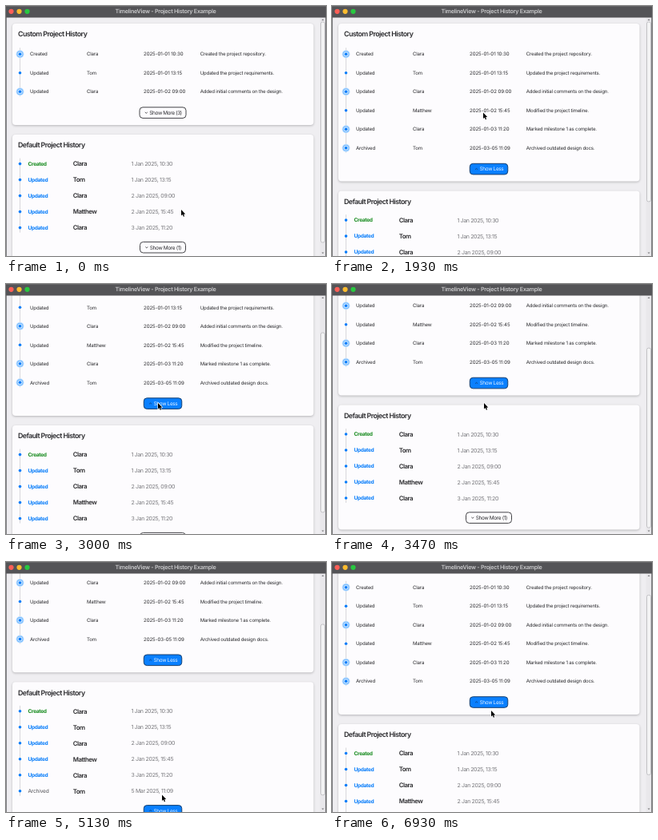
These frames come from a looping animation (400x313 px, 7000 ms). An HTML page with a canvas:

```html
<!DOCTYPE html>
<html lang="en">
<head>
<meta charset="utf-8">
<title>TimelineView</title>
<style>
html, body { margin: 0; width: 100%; height: 100%; overflow: hidden; background: #444; }
canvas { display: block; width: 400px; height: 313px; }
</style>
</head>
<body>
<canvas id="stage"></canvas>
<script>
const W = 400, H = 313, LOOP = 7000;
const canvas = document.getElementById('stage');
const ctx = canvas.getContext('2d');
const dpr = window.devicePixelRatio || 1;
canvas.width = W * dpr;
canvas.height = H * dpr;
ctx.textRendering = 'geometricPrecision';

const BLUE = '#087dfa', INK = '#29292c', GREY = '#77777b';
const FAMILY = 'Inter, "Liberation Sans", sans-serif';
const STYLES = {
  bar:    { size: 7.2, weight: 600, gap: -0.28 },
  title:  { size: 8.8, weight: 600, gap: -0.55 },
  cell:   { size: 6.1, weight: 400, gap: -0.19 },
  stamp:  { size: 6.1, weight: 400, gap: -0.06 },
  button: { size: 6.5, weight: 400, gap: -0.38 },
  state:  { size: 6.6, weight: 700, gap: -0.36 },
  plain:  { size: 6.6, weight: 400, gap: -0.2 },
  name:   { size: 7.8, weight: 600, gap: -0.48 },
  date:   { size: 7, weight: 400, gap: -0.36 }
};

// action, person, time, note, has halo
const EVENTS = [
  ['Created', 'Clara', '2025-01-01 10:30', 'Created the project repository.', true],
  ['Updated', 'Tom', '2025-01-01 13:15', 'Updated the project requirements.', false],
  ['Updated', 'Clara', '2025-01-02 09:00', 'Added initial comments on the design.', true],
  ['Updated', 'Matthew', '2025-01-02 15:45', 'Modified the project timeline.', false],
  ['Updated', 'Clara', '2025-01-03 11:20', 'Marked milestone 1 as complete.', true],
  ['Archived', 'Tom', '2025-03-05 11:09', 'Archived outdated design docs.', true]
];
const MONTHS = { '01': 'Jan', '03': 'Mar' };

// time, x, y; eased between entries
const POINTER = [
  [70, 219, 255], [1130, 189, 133.5], [1930, 189, 133.5], [2270, 190, 149],
  [3730, 190, 149], [4270, 195, 291.5], [5200, 195, 291.5], [5600, 196, 288.5],
  [6640, 196, 288.5], [6930, 199, 186]
];
const OPEN_FIRST = 1430, OPEN_SECOND = 4600, CLOSE_SECOND = 5950;

const clamp = v => Math.max(0, Math.min(1, v));
const smooth = v => v * v * (3 - 2 * v);

function pointerAt(t) {
  let a = POINTER[0];
  for (const b of POINTER) {
    if (t < b[0]) {
      const k = smooth(clamp((t - a[0]) / (b[0] - a[0])));
      return { x: a[1] + (b[1] - a[1]) * k, y: a[2] + (b[2] - a[2]) * k };
    }
    a = b;
  }
  return { x: a[1], y: a[2] };
}

function scrollAt(t) {
  const span = (from, to) => clamp((t - from) / (to - from));
  if (t < 3000) return t < 2470 ? 4.3 * span(2400, 2470) : 4.3 + 50.1 * span(2470, 3000);
  if (t < 5200) return 54.4 + 26.9 * (1 - (1 - span(3000, 3600)) ** 2);
  // collapsing the second list shortens the page, so the view snaps back
  if (t < CLOSE_SECOND) return 81.3 + 20 * smooth(span(5200, 5700));
  return 81.3 - 52.7 * smooth(span(6130, 6600));
}

function text(str, x, y, style, color, align = 'left') {
  const s = STYLES[style];
  ctx.font = `${s.weight} ${s.size}px ${FAMILY}`;
  ctx.letterSpacing = s.gap + 'px';
  ctx.textAlign = align;
  ctx.fillStyle = color;
  ctx.fillText(str, x, y + s.size * 0.36);
}

function disc(x, y, r, color) {
  ctx.fillStyle = color;
  ctx.beginPath();
  ctx.arc(x, y, r, 0, Math.PI * 2);
  ctx.fill();
}

function box(x, y, w, h, r, fill, stroke) {
  ctx.beginPath();
  ctx.roundRect(x, y, w, h, r);
  ctx.fillStyle = fill;
  ctx.fill();
  if (stroke) {
    ctx.strokeStyle = stroke;
    ctx.lineWidth = 1;
    ctx.stroke();
  }
}

function path(points, close) {
  ctx.beginPath();
  points.forEach(([x, y]) => ctx.lineTo(x, y));
  if (close) ctx.closePath();
}

function card(y, h, title) {
  ctx.save();
  ctx.shadowColor = 'rgba(0,0,0,0.24)';
  ctx.shadowBlur = 3 * dpr;
  ctx.shadowOffsetY = dpr;
  box(8, y, 376.5, h, 4, '#fdfcfe');
  ctx.restore();
  text(title, 15, y + 13.3, 'title', INK);
}

function rail(from, to) {
  ctx.fillStyle = '#cfcfd3';
  ctx.fillRect(17.1, from, 0.8, to - from);
}

function button(y, hidden, open, mouse) {
  const w = open ? 47.5 : hidden > 1 ? 58 : 57;
  const x = 196 - w / 2;
  const over = mouse.x > x && mouse.x < x + w && Math.abs(mouse.y - y) < 7;
  const active = open || over;
  box(x, y - 6.8, w, 13.6, 4, active ? '#0a80ff' : '#fdfcfe', active ? '#173f6e' : '#444448');
  const tip = open ? -0.7 : 0.7;
  path([[x + 6.8, y - tip], [x + 8.3, y + tip], [x + 9.8, y - tip]]);
  ctx.strokeStyle = active ? '#123a6b' : INK;
  ctx.lineWidth = 0.8;
  ctx.stroke();
  const label = open ? 'Show Less' : `Show More (${hidden})`;
  text(label, x + 12.3, y, 'button', active ? '#e4f1ff' : INK);
}

function haloDot(x, y) {
  disc(x, y, 5, '#c3e1ff');
  disc(x, y, 4, '#74baff');
  disc(x, y, 3, '#c3e1ff');
  disc(x, y, 1.8, BLUE);
}

function customRows(y, count) {
  rail(y - 8, y + 23.5 * (count - 1) + 6);
  EVENTS.slice(0, count).forEach(([action, who, when, note, halo], i) => {
    const ry = y + i * 23.5;
    if (halo) haloDot(17.5, ry);
    else disc(17.5, ry, 1.8, BLUE);
    text(action, 30, ry, 'cell', INK);
    text(who, 101, ry, 'cell', INK);
    text(when, 172, ry, 'stamp', INK);
    text(note, 242.7, ry, 'cell', INK);
  });
}

function longDate(stamp) {
  const [day, time] = stamp.split(' ');
  const [year, month, date] = day.split('-');
  return `${+date} ${MONTHS[month]} ${year}, ${time}`;
}

function defaultRows(y, count) {
  const colors = { Created: '#148a1c', Updated: BLUE, Archived: '#555559' };
  rail(y - 7, y + 20 * (count - 1) + 6);
  EVENTS.slice(0, count).forEach(([action, who, when], i) => {
    const ry = y + i * 20;
    disc(17.5, ry, 1.8, BLUE);
    text(action, 27.5, ry, action === 'Archived' ? 'plain' : 'state', colors[action]);
    text(who, 83.7, ry, 'name', INK);
    text(longDate(when), 156.5, ry, 'date', GREY);
  });
}

function scrollBar(scroll, content) {
  ctx.fillStyle = '#e9e8eb';
  ctx.fillRect(392.5, 14, 7.5, 299);
  const len = 286 * 299 / content;
  box(393.5, 20 + scroll / content * 286, 5, len, 2, '#f3f3f4', '#c2c2c5');
  ctx.fillStyle = '#77777a';
  path([[394.5, 18], [396, 16.3], [397.5, 18]], true);
  ctx.fill();
  path([[394.5, 308.5], [396, 310.2], [397.5, 308.5]], true);
  ctx.fill();
}

function windowFrame() {
  ctx.fillStyle = '#66666a';
  ctx.fillRect(0, 14, 0.8, 299);
  ctx.fillRect(399.2, 14, 0.8, 299);
  ctx.fillStyle = '#545457';
  ctx.fillRect(0, 0, W, 14.5);
  ctx.fillStyle = '#69696c';
  ctx.fillRect(0, 0, W, 0.8);
  ['#ff5f57', '#febc2e', '#28c840'].forEach((c, i) => disc(6.5 + i * 10, 6.8, 3.1, c));
  text('TimelineView - Project History Example', 199.5, 6.8, 'bar', '#cacacc', 'center');
}

function pointer({ x, y }) {
  ctx.save();
  ctx.translate(x, y);
  path([[0, 0], [0, 7.6], [1.7, 6.1], [2.9, 8.8], [4.1, 8.3], [3, 5.7], [5.2, 5.5]], true);
  ctx.lineJoin = 'round';
  ctx.strokeStyle = '#fff';
  ctx.lineWidth = 1.2;
  ctx.stroke();
  ctx.fillStyle = '#000';
  ctx.fill();
  ctx.restore();
}

function draw(t) {
  const mouse = pointerAt(t), scroll = scrollAt(t);
  const first = t >= OPEN_FIRST;
  const second = t >= OPEN_SECOND && t < CLOSE_SECOND;
  const grow1 = first ? 70.5 : 0, grow2 = second ? 20 : 0;
  ctx.setTransform(dpr, 0, 0, dpr, 0, 0);
  ctx.fillStyle = '#efeef1';
  ctx.fillRect(0, 0, W, H);

  const top = 22 - scroll;
  card(top, 127 + grow1, 'Custom Project History');
  customRows(top + 38.3, first ? 6 : 3);
  button(top + 111.6 + grow1, 3, first, mouse);

  const next = top + 139 + grow1;
  card(next, 156 + grow2, 'Default Project History');
  defaultRows(next + 36.6, second ? 6 : 5);
  button(next + 141.2 + grow2, 1, second, mouse);

  scrollBar(scroll, 309.8 + grow1 + grow2);
  windowFrame();
  pointer(mouse);
}

function tick(now) {
  draw(now % LOOP);
  requestAnimationFrame(tick);
}
draw(0);
requestAnimationFrame(tick);
</script>
</body>
</html>
```
